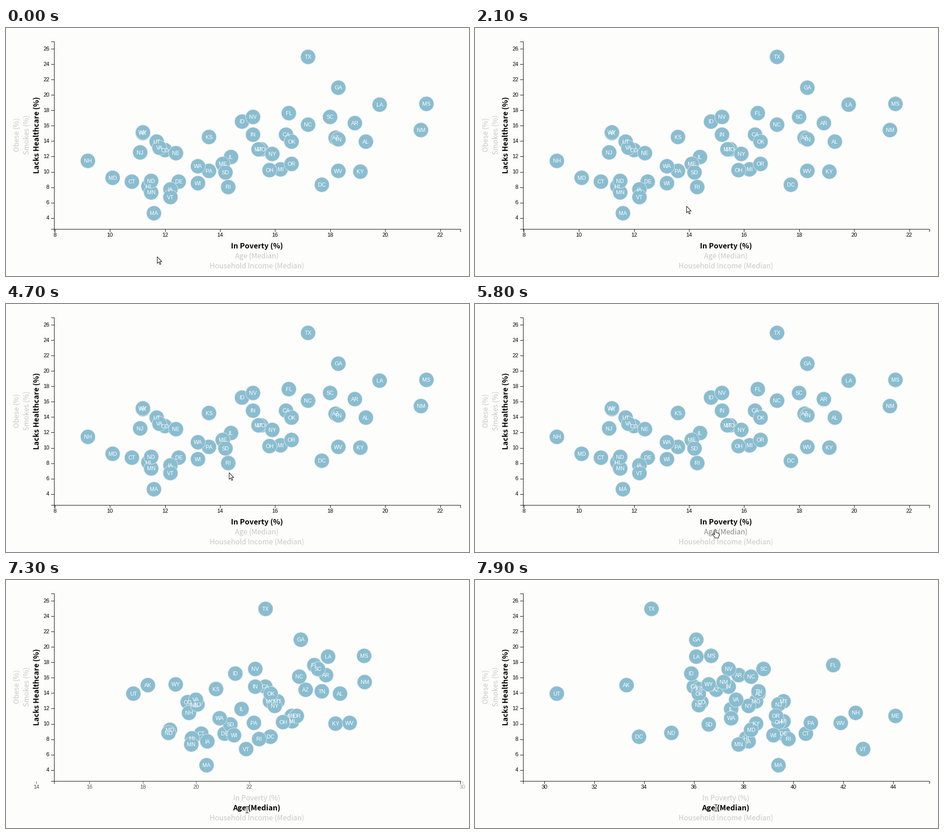
Animation, 1021 px wide and 549 px high, one loop 8 s. Source, as a matplotlib script:

```python
import numpy as np
import matplotlib.pyplot as plt
from matplotlib.animation import FuncAnimation
from matplotlib.patches import Circle, FancyBboxPatch, Polygon

W, H, DPI = 1021, 549, 100
FRAMES, STEP = 80, 100
PX = 72 / DPI
UI, PLAIN = "Noto Sans CJK JP", "Liberation Sans"
FILL, RIM, MUTED, HOVER = "#89bdd0", "#e3e3e3", "#c9c9c9", "#888888"

STATES = ("AL AK AZ AR CA CO CT DE DC FL GA HI ID IL IN IA KS KY LA ME MD MA MI MN MS MO MT "
          "NE NV NH NJ NM NY NC ND OH OK OR PA RI SC SD TN TX UT VT VA WA WV WI WY").split()
POVERTY = np.array([
    19.3, 11.2, 18.2, 18.9, 16.4, 12, 10.8, 12.5, 17.7, 16.5, 18.3, 11.4, 14.8, 14.4, 15.2, 12.2, 13.6,
    19.1, 19.8, 14.1, 10.1, 11.6, 16.2, 11.5, 21.5, 15.5, 15.4, 12.4, 15.2, 9.2, 11.1, 21.3, 15.9, 17.2,
    11.5, 15.8, 16.6, 16.6, 13.6, 14.3, 18, 14.2, 18.3, 17.2, 11.7, 12.2, 11.8, 13.2, 18.3, 13.2, 11.2])
UNINSURED = np.array([
    13.9, 15, 14.4, 16.3, 14.8, 12.8, 8.7, 8.7, 8.3, 17.6, 20.9, 8.1, 16.5, 11.9, 14.8, 7.7, 14.5,
    10, 18.7, 11, 9.2, 4.6, 10.3, 7.3, 18.8, 12.9, 12.9, 12.4, 17.1, 11.4, 12.5, 15.4, 12.3, 16.1,
    8.8, 10.2, 13.9, 11, 10.1, 8, 17.1, 9.9, 14.2, 24.9, 13.9, 6.7, 13.1, 10.7, 10.1, 8.5, 15.1])
AGE = np.array([
    38.6, 33.3, 36.9, 37.8, 36, 36.3, 40.5, 39.6, 33.8, 41.6, 36.1, 38.1, 35.9, 37.5, 37.4, 38.2, 36.2,
    38.5, 36.1, 44.1, 38.3, 39.4, 39.6, 37.8, 36.7, 38.5, 39.6, 36.2, 37.4, 42.5, 39.4, 37.2, 38.2, 38.3,
    35.1, 39.4, 36.2, 39.3, 40.7, 39.8, 38.8, 36.6, 38.6, 34.3, 30.5, 42.8, 37.7, 37.5, 41.9, 39.2, 36.6])

CLICK, DURATION, FADE = 6861, 1000, 300
TIP_ON, TIP_OFF = 2700, 4700

# Pointer path: time, x, y
STOPS = [(0, 333, 506), (700, 333, 506), (2100, 466, 394), (2800, 486, 361), (3600, 487, 360),
         (4500, 488, 361), (5600, 529, 499), (6800, 529, 499), (6900, 530, 507),
         (7500, 530, 507), (7900, 530, 503)]

ARROW = [(0, 0), (0, 14.5), (3.3, 11.4), (5.7, 17), (8, 16), (5.6, 10.6), (10.2, 10.6)]
HAND = [(-.5, 0), (1.2, 0), (2.2, 1), (2.2, 6.5), (5, 7), (7.5, 8), (9, 9), (9, 13), (7.5, 16),
        (7.5, 18.5), (-.5, 18.5), (-1.5, 16), (-5.5, 11), (-5.5, 9.5), (-4, 9), (-1.2, 11.5), (-1.2, 1)]
BEAM = [(-3, -7), (3, -7), (0, -7), (0, 7), (3, 7), (-3, 7), (0, 7), (0, -7)]


def poverty_x(v):
    return 107.7 + (v - 8) * 60.7


def age_x(v):
    return 153 + (v - 30) * 54.92


def value_y(v):
    return 420.3 - (v - 4) * 17.05


def cubic_in_out(t):
    t = np.clip(t, 0, 1)
    return 4 * t ** 3 if t < .5 else 1 - 4 * (1 - t) ** 3


def pointer(ms):
    for (t0, x0, y0), (t1, x1, y1) in zip(STOPS, STOPS[1:]):
        if ms <= t1:
            k = (ms - t0) / (t1 - t0)
            k = k * k * (3 - 2 * k)
            return x0 + (x1 - x0) * k, y0 + (y1 - y0) * k
    return STOPS[-1][1:]


fig = plt.figure(figsize=(W / DPI, H / DPI), dpi=DPI, facecolor="#fdfdfc")
ax = fig.add_axes([0, 0, 1, 1])
ax.set(xlim=(0, W), ylim=(H, 0))
ax.axis("off")


def label(x, y, text, size, font=PLAIN, **style):
    style = {"ha": "center", "va": "baseline", "color": "black", **style}
    return ax.text(x, y, text, fontsize=size * PX, family=font, **style)


def line(xs, ys, color="black"):
    return ax.plot(xs, ys, color=color, lw=PX, solid_capstyle="butt", zorder=1)[0]


def restyle(text, active, color):
    text.set(color=color, fontweight="bold" if active else "light",
             fontsize=(16.3 if active else 15.8) * PX)


line([98.5, 105.5, 105.5, 98.5], [29.5, 29.5, 444.5, 444.5])
line([105.5, 105.5, 1001.5, 1001.5], [451, 444.5, 444.5, 451])
for v in range(4, 27, 2):
    y = np.floor(value_y(v)) + .5
    line([98.5, 105.5], [y, y])
    label(95.5, y + 4, str(v), 12, ha="right")

ticks = [(v, line([0, 0], [445, 451]), label(0, 462, str(v), 12, zorder=1))
         for v in (*range(8, 23, 2), *range(30, 45, 2))]

for x, text, active in ((29, "Obese (%)", False), (51, "Smokes (%)", False),
                        (73, "Lacks Healthcare (%)", True)):
    side = label(x, 236.5, text, 16, UI, rotation=90, rotation_mode="anchor")
    restyle(side, active, "black" if active else MUTED)

poverty_label = label(553, 488, "In Poverty (%)", 16, UI)
age_label = label(553, 510, "Age (Median)", 16, UI)
restyle(label(553, 532, "Household Income (Median)", 16, UI), False, MUTED)

dots, names = [], []
for name, v in zip(STATES, UNINSURED):
    y = value_y(v)
    dots.append(ax.add_patch(Circle((0, y), 16.3, fc=FILL, ec=RIM, lw=PX, zorder=2)))
    names.append(label(0, y + 4.3, name, 12, color="white", zorder=3))
hovered = dots[STATES.index("RI")]

tooltip = [ax.add_patch(FancyBboxPatch((343, 320), 126, 62, boxstyle="round,pad=4,rounding_size=4",
                                       fc=(0, 0, 0, .8), ec="none", zorder=4))]
for y, text, weight in ((337, "Rhode Island", "bold"), (356.5, "Poverty: 14.3%", "normal"),
                        (375.5, "Lacks Healthcare: 8%", "normal")):
    tooltip.append(label(406, y, text, 12.1, UI, color="white", weight=weight, zorder=5))

cursor = ax.add_patch(Polygon(ARROW, fc="white", ec="black", lw=PX, joinstyle="round", zorder=6))


def draw(i):
    ms = i * STEP
    e = cubic_in_out((ms - CLICK) / DURATION)

    xs = poverty_x(POVERTY) * (1 - e) + age_x(AGE) * e
    for x, dot, name in zip(xs, dots, names):
        dot.center = x, dot.center[1]
        name.set_x(x)

    for v, mark, text in ticks:
        x = poverty_x(v) * (1 - e) + age_x(v) * e
        mark.set_xdata([x, x])
        text.set_x(x)
        for part in (mark, text):
            part.set_alpha(e if v >= 30 else 1 - e)

    show_tip = TIP_ON <= ms < TIP_OFF
    for part in tooltip:
        part.set_visible(show_tip)
    hovered.set(fc="#a3cbda" if show_tip else FILL, ec="#47758a" if show_tip else RIM,
                lw=(1.5 if show_tip else 1) * PX)

    x, y = pointer(ms)
    clicked = ms >= CLICK
    over_age = 496 <= y <= 516 and 504 <= x <= 602
    over_poverty = 474 <= y < 496 and 494 <= x <= 610
    if clicked:
        shade = .79 * min(1, .35 + (ms - CLICK) / FADE)
        restyle(poverty_label, False, (shade,) * 3)
        restyle(age_label, True, "black")
    else:
        restyle(poverty_label, True, "black")
        restyle(age_label, False, HOVER if over_age else MUTED)

    shape = BEAM if clicked or over_poverty else HAND if over_age else ARROW
    cursor.set_xy(np.array(shape) + (x + .5, y + .5))
    return []


anim = FuncAnimation(fig, draw, frames=FRAMES, interval=STEP, repeat=True, repeat_delay=0)
plt.show()
```
